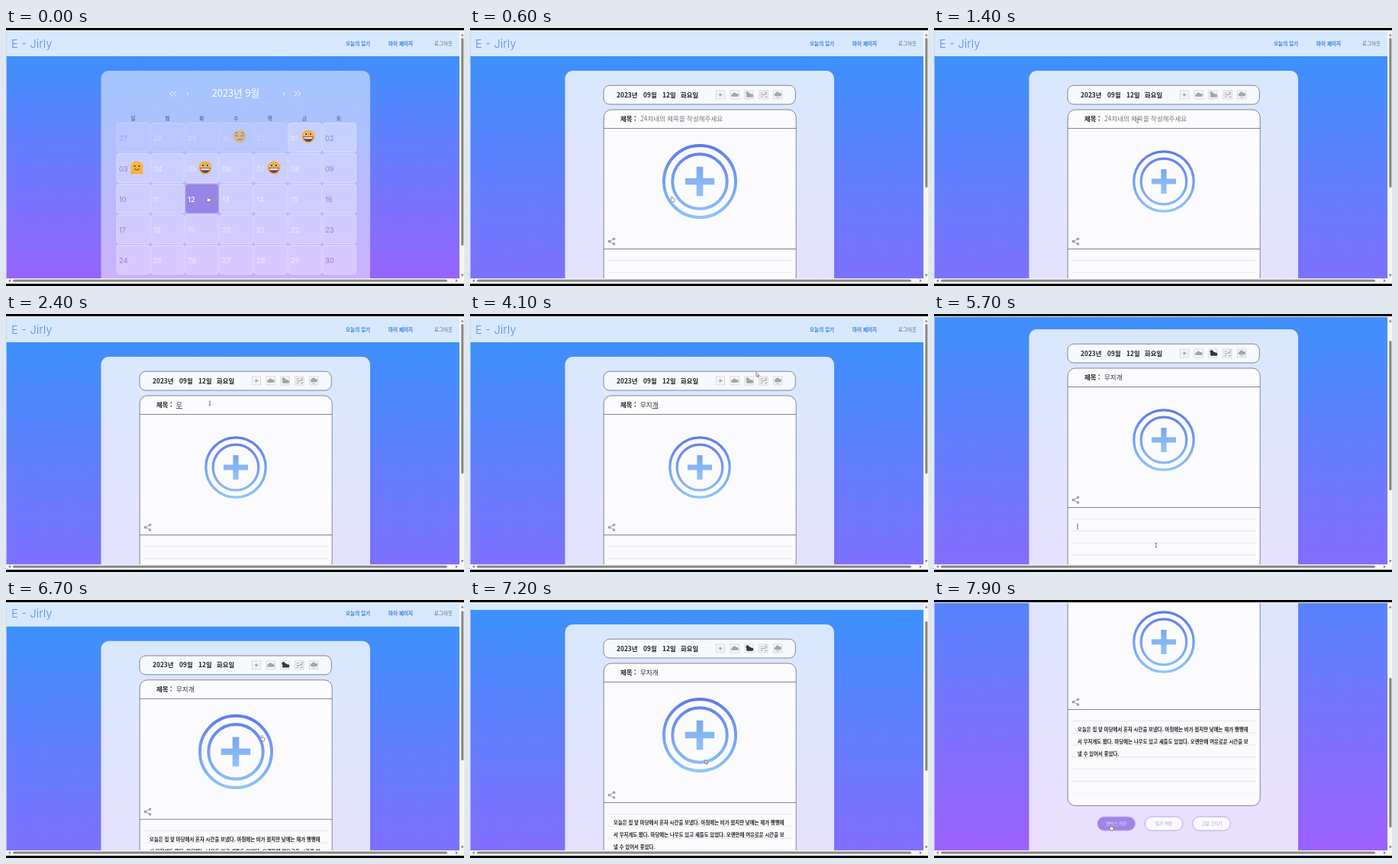
Animation, 600 px wide and 338 px high, one loop 8 s. Source, as an HTML page:

```html
<!DOCTYPE html>
<html lang="ko">
<head>
<meta charset="utf-8">
<title>Diary</title>
<style>
html, body { margin: 0; width: 100%; height: 100%; overflow: hidden; background: #000; }
svg { display: block; width: 100vw; height: 100vh; }
text { font-family: "Noto Sans CJK KR", "Noto Sans CJK", "Noto Sans", sans-serif; white-space: pre; }
.logo, .num { font-family: Inter, "Noto Sans CJK KR", sans-serif; font-weight: 300; }
.bold { font-weight: 700; }
.medium { font-weight: 500; }
.mid { text-anchor: middle; }
</style>
</head>
<body>
<svg id="stage" viewBox="0 0 600 338" xmlns="http://www.w3.org/2000/svg">
  <defs>
    <linearGradient id="sky" x2="0" y2="1">
      <stop stop-color="#3694fd"/><stop offset="1" stop-color="#a25eff"/>
    </linearGradient>
    <linearGradient id="ring" gradientUnits="userSpaceOnUse" x1="0" y1="-41" x2="0" y2="41">
      <stop stop-color="#5d7aea"/><stop offset="1" stop-color="#8ec6fa"/>
    </linearGradient>
    <linearGradient id="cross" gradientUnits="userSpaceOnUse" x1="0" y1="-16" x2="0" y2="16">
      <stop stop-color="#7ca8f1"/><stop offset="1" stop-color="#90c4f9"/>
    </linearGradient>
    <clipPath id="view"><rect x=".5" y="4" width="593.5" height="324"/></clipPath>
    <g id="grin">
      <circle r="8.6" fill="#f0b044"/>
      <circle cx="-3.2" cy="-3" r="1.8" fill="#f6ead8"/><circle cx="3.2" cy="-3" r="1.8" fill="#f6ead8"/>
      <circle cx="-3" cy="-3" r="1.2" fill="#4a3328"/><circle cx="3" cy="-3" r="1.2" fill="#4a3328"/>
      <path d="M-6.6 0H6.6Q6.2 7 0 7T-6.6 0Z" fill="#6d4356"/>
      <path d="M-5.8 .8H5.8L5.2 3.2H-5.2Z" fill="#e9e0ea"/>
    </g>
    <g id="hug">
      <circle r="8.4" fill="#f8b440"/>
      <circle cx="-2.8" cy="-2" r="1.1" fill="#4a3328"/><circle cx="3" cy="-2" r="1.1" fill="#4a3328"/>
      <path d="M-3.2 1.4Q0 4.6 3.4 1.4" fill="none" stroke="#7a3d22" stroke-width="1.1"/>
      <circle cx="-5.6" cy="6" r="2.7" fill="#f5ad36"/><circle cx="5.6" cy="6" r="2.7" fill="#f5ad36"/>
    </g>
    <g id="sad">
      <circle r="8.4" fill="#e6b15a"/>
      <path d="M-6-1.5Q-4 .5-1.6-1M6-1.5Q4 .5 1.6-1M-3 5Q0 2 3 5M-6-4L-2.5-5M6-4L2.5-5" fill="none" stroke="#6b4a32" stroke-width="1"/>
      <path d="M4 1Q6.2 4 4.2 5T4 1Z" fill="#6ab0ee"/>
    </g>
  </defs>
  <rect width="600" height="338" fill="#000"/>
  <rect y="3" width="600" height="332" fill="#f6f6f8"/>
  <g clip-path="url(#view)"><g id="calendar"></g><g id="diary"></g></g>
  <g id="bars" fill="#858585">
    <path d="M595.8 10.5L597.8 7.5L599.8 10.5ZM595.8 322.5L597.8 325.5L599.8 322.5ZM6 329L3 331L6 333ZM589 329L592 331L589 333Z"/>
    <rect x="9" y="329.5" width="569" height="3" rx="1.5"/>
    <rect id="thumb" x="596.4" width="3" rx="1.5"/>
  </g>
  <g id="pointer"></g>
</svg>
<script>
const LOOP = 8000;
const $ = id => document.getElementById(id);
const label = (x, y, size, fill, str, cls = '', extra = '') =>
  `<text x="${x}" y="${y}" font-size="${size}" fill="${fill}" class="${cls}" ${extra}>${str}</text>`;
const box = (x, y, w, h, r, fill, extra = '') =>
  `<rect x="${x}" y="${y}" width="${w}" height="${h}" rx="${r}" fill="${fill}" ${extra}/>`;
const line = (x1, x2, y, color) => `<path d="M${x1} ${y}H${x2}" stroke="${color}" stroke-width="1"/>`;

const page = (height, veil) =>
  box(0, 4, 596, height, 0, 'url(#sky)') +
  box(0, 4, 596, 33, 0, '#fff', 'opacity=".8"') +
  label(7, 25.5, 15, '#568fe2', 'E - Jirly', 'logo') +
  label(445, 22.6, 6.6, '#3c80d8', '오늘의 일기', 'bold') +
  label(501, 22.6, 6.6, '#3c80d8', '마이 페이지', 'bold') +
  label(561, 22.6, 6.5, '#666', '로그아웃', 'medium') +
  box(124.5, 56, 352.5, height, 10, '#fff', `opacity="${veil}"`);

function drawCalendar() {
  let out = page(361, .5);
  const chevrons = [[217, -1], [221.5, -1], [238, -1], [364, 1], [379.5, 1], [384, 1]];
  for (const [x, dir] of chevrons) {
    const s = x === 238 || x === 364 ? 2 : 3.6;
    out += `<path d="M${x - dir * s / 2} ${86 - s}L${x + dir * s / 2} 86L${x - dir * s / 2} ${86 + s}" fill="none" stroke="#fff" stroke-width=".9"/>`;
  }
  out += label(301, 90, 12.8, '#fff', '2023년 9월', 'mid medium');
  [...'일월화수목금토'].forEach((d, i) => out += label(166.5 + i * 44.9, 120.8, 7, '#4a4f70', d, 'mid medium'));
  for (let i = 0; i < 35; i++) {
    const col = i % 7, x = 145 + col * 45, y = 124.5 + Math.floor(i / 7) * 40;
    const old = i < 5, picked = i === 16;
    const day = old ? 27 + i : i - 4;
    const ink = picked ? '#fff' : col === 0 || col === 6 ? '#8567d3' : '#f8f4ff';
    out += box(x, y, 43.5, 38, 3.5, picked ? '#9785e6' : '#fff',
      picked ? 'stroke="#b4a2f0"' : `fill-opacity="${old ? .12 : .28}" stroke="#fff" stroke-opacity="${old ? .2 : .4}"`);
    out += label(x + 3, y + 23.6, 9.5, ink, String(day).padStart(2, '0'), 'num', `opacity="${old ? .55 : 1}" ${picked ? 'style="font-weight:500"' : ''}`);
  }
  const moods = [['sad', 306, 142, .7], ['grin', 396, 142, 1], ['hug', 171.5, 183, 1], ['grin', 261, 183, 1], ['grin', 351, 183, 1]];
  for (const [id, x, y, o] of moods) out += `<use href="#${id}" x="${x}" y="${y}" opacity="${o}"/>`;
  return out;
}

const cloud = 'M-3.5 2.5A2 2 0 0 1-3.2-1.2A3 3 0 0 1 2.2-1.6A2.1 2.1 0 0 1 3.4 2.5Z';
const weather = [
  '<circle r="1.7"/><circle r="3" fill="none" stroke="currentColor" stroke-width=".8" stroke-dasharray=".8 1.55"/>',
  `<path d="${cloud}"/>`,
  `<circle cx="-2" cy="-2" r="2.2"/><path transform="translate(.8 .8)" d="${cloud}"/>`,
  '<path d="M-4-2.5H0M1.5-3.5H4V-1H1M-4 .2H3M-4 3H-1.5V1M1 3.2H4V1.5" fill="none" stroke="currentColor"/>',
  `<path transform="translate(0 -.8)" d="${cloud}"/><path d="M-2 2.2V4M0 2.2V4.4M2 2.2V4" stroke="currentColor" stroke-width=".8"/>`
];

function drawDiary() {
  const edge = '#82868f';
  let out = page(491, .8) +
    box(175, 75.2, 251.3, 24.8, 8, '#f6f9fe', `stroke="${edge}"`) +
    [['2023년', 192], ['09월', 227], ['12일', 252], ['화요일', 276]]
      .map(([s, x]) => label(x, 90.6, 8.4, '#222', s, 'bold')).join('');
  weather.forEach((art, i) => {
    const x = 328 + i * 18.8;
    out += box(x - 5.6, 82, 11.2, 11, 0, '#f8f8fa', 'stroke="#cfd1d6" stroke-width=".8"') +
      `<g class="weather" transform="translate(${x} 87.5)" color="#a4a6aa" fill="currentColor">${art}</g>`;
  });
  out += box(175.2, 107, 252, 308.5, 10, '#fbfbfe', `stroke="${edge}"`) +
    line(175, 427, 131.5, edge) + line(175, 427, 289.5, edge) +
    label(197, 122.3, 8.5, '#222', '제목 :', 'bold') +
    label(223, 122.3, 8.5, '#777', '24자내의 제목을 작성해주세요', '', 'id="hint"') +
    label(223, 122.3, 8.5, '#222', '<tspan id="done"></tspan><tspan id="wip" text-decoration="underline"></tspan>', 'medium');
  out += `<g id="plus" fill="none" stroke="url(#ring)" stroke-width="3.3">
    <circle r="39.2"/><circle r="29.8"/>
    <path d="M-16-3.6H-3.6V-16H3.6V-3.6H16V3.6H3.6V16H-3.6V3.6H-16Z" fill="url(#cross)" stroke="none"/></g>`;
  out += `<g fill="#a0a0a4"><path d="M188.5 276.2L182.5 279.6L188.5 282.9" fill="none" stroke="#a0a0a4" stroke-width="1"/>
    <circle cx="182.4" cy="279.6" r="1.8"/><circle cx="188.6" cy="276.2" r="1.8"/><circle cx="188.6" cy="282.9" r="1.8"/></g>`;
  for (let i = 0; i < 7; i++) out += line(181, 421, 304.4 + i * 15.8, i < 6 ? '#e6e6ea' : '#f0f0f3');
  out += '<path id="caret" d="M188 310.5V318.5" stroke="#333" stroke-width=".8"/><g id="story">' + [
    '오늘은 집 앞 마당에서 혼자 시간을 보냈다. 아침에는 비가 왔지만 낮에는 해가 쨍쨍해',
    '서 무지개도 봤다. 마당에는 나무도 있고 새들도 있었다. 오랜만에 여유로운 시간을 보',
    '낼 수 있어서 좋았다.'
  ].map((s, i) => label(188, 317.8 + i * 16, 6.4, '#222', s, 'bold')).join('') + '</g>';
  ['캔버스 저장', '일기 저장', '그림 그리기'].forEach((s, i) => {
    const x = 214 + i * 62.4;
    out += `<g class="button">${box(x, 430, 49.5, 18, 9, '#fbfaff', 'stroke="#b9a6ec"')}` +
      label(x + 24.8, 441.2, 5.6, '#a793dc', s, 'mid') + '</g>';
  });
  return out;
}

const cursors = {
  hand: '<path d="M-1.2-3.2Q-.4-4 .2-3.2V-.8L2.6-.2Q3.4 0 3.2 1L2.6 3.8H-.6L-2.6 1Q-2.4 0-1.2 .6Z" fill="#fff" stroke="#555" stroke-width=".6"/>',
  arrow: '<path d="M-1-2.5V3L.3 1.9L1.3 4L2.2 3.5L1.2 1.5H3Z" fill="#fff" stroke="#444" stroke-width=".6"/>',
  beam: '<path d="M-1.3-2.6H1.3M0-2.6V2.6M-1.3 2.6H1.3" fill="none" stroke="#555" stroke-width=".7"/>'
};

// Tables: rows of [time, values...]
const scrollKeys = [[5450, 0], [5620, 36], [6300, 36], [6720, 2], [6850, 0], [7080, 0], [7550, 146]];
const plusKeys = [[300, 1], [550, 1.2], [950, 1.2], [1250, 1], [6250, 1], [6550, 1.2], [7200, 1.2], [7450, 1]];
const pathKeys = [[700, 265, 224], [1500, 267, 117], [3500, 267, 117], [4080, 376, 79], [4150, 376, 79], [4400, 367, 88],
  [4700, 367, 88], [5350, 291, 303], [5900, 291, 303], [6350, 330, 190], [6650, 336, 181], [7000, 336, 181], [7600, 232, 298]];
const cursorSteps = [[0, 'hand'], [1150, 'arrow'], [1300, 'beam'], [3700, 'arrow'], [4300, 'hand'], [4850, 'arrow'],
  [5200, 'beam'], [6200, 'hand'], [7200, 'arrow'], [7500, 'hand']];
const typeSteps = [[0, '', ''], [2150, '', 'ㅁ'], [2300, '', '무'], [2650, '', '뭊'], [2850, '무', '지'],
  [3050, '무', '직'], [3200, '무지', '개'], [4500, '무지개', '']];

const step = (t, rows) => rows.filter(r => r[0] <= t).pop();
function tween(t, rows) {
  const i = rows.findIndex(r => r[0] > t);
  if (i === 0) return rows[0].slice(1);
  if (i < 0) return rows[rows.length - 1].slice(1);
  const a = rows[i - 1], b = rows[i];
  const p = (t - a[0]) / (b[0] - a[0]), e = p * p * (3 - 2 * p);
  return a.slice(1).map((v, k) => v + (b[k + 1] - v) * e);
}
const show = (el, on) => el.setAttribute('visibility', on ? 'inherit' : 'hidden');

$('calendar').innerHTML = drawCalendar();
$('diary').innerHTML = drawDiary();
const cloudy = document.querySelectorAll('.weather')[2];
const [face, caption] = document.querySelector('.button').children;
let shape = '';

function render(t) {
  const open = t >= 300;
  show($('calendar'), !open);
  show($('diary'), open);

  const [scroll] = tween(t, scrollKeys);
  $('diary').setAttribute('transform', `translate(0 ${-scroll})`);
  $('thumb').setAttribute('y', 13 + scroll * .61);
  $('thumb').setAttribute('height', open ? 196 : 272);
  $('plus').setAttribute('transform', `translate(301 201) scale(${tween(t, plusKeys)[0]})`);

  const [, done, wip] = step(t, typeSteps);
  $('done').textContent = done;
  $('wip').textContent = wip;
  show($('hint'), !done && !wip);
  cloudy.setAttribute('color', t >= 4500 ? '#34363a' : '#a4a6aa');
  show($('caret'), t >= 5640 && t < 6000);
  show($('story'), t >= 6000);

  const hover = t >= 7550;
  face.setAttribute('fill', hover ? '#a084e6' : '#fbfaff');
  caption.setAttribute('fill', hover ? '#e6dcff' : '#a793dc');

  const kind = step(t, cursorSteps)[1];
  if (kind !== shape) $('pointer').innerHTML = cursors[shape = kind];
  $('pointer').setAttribute('transform', `translate(${tween(t, pathKeys)})`);
}

const start = performance.now();
function tick() {
  render((performance.now() - start) % LOOP);
  requestAnimationFrame(tick);
}
tick();
</script>
</body>
</html>
```
